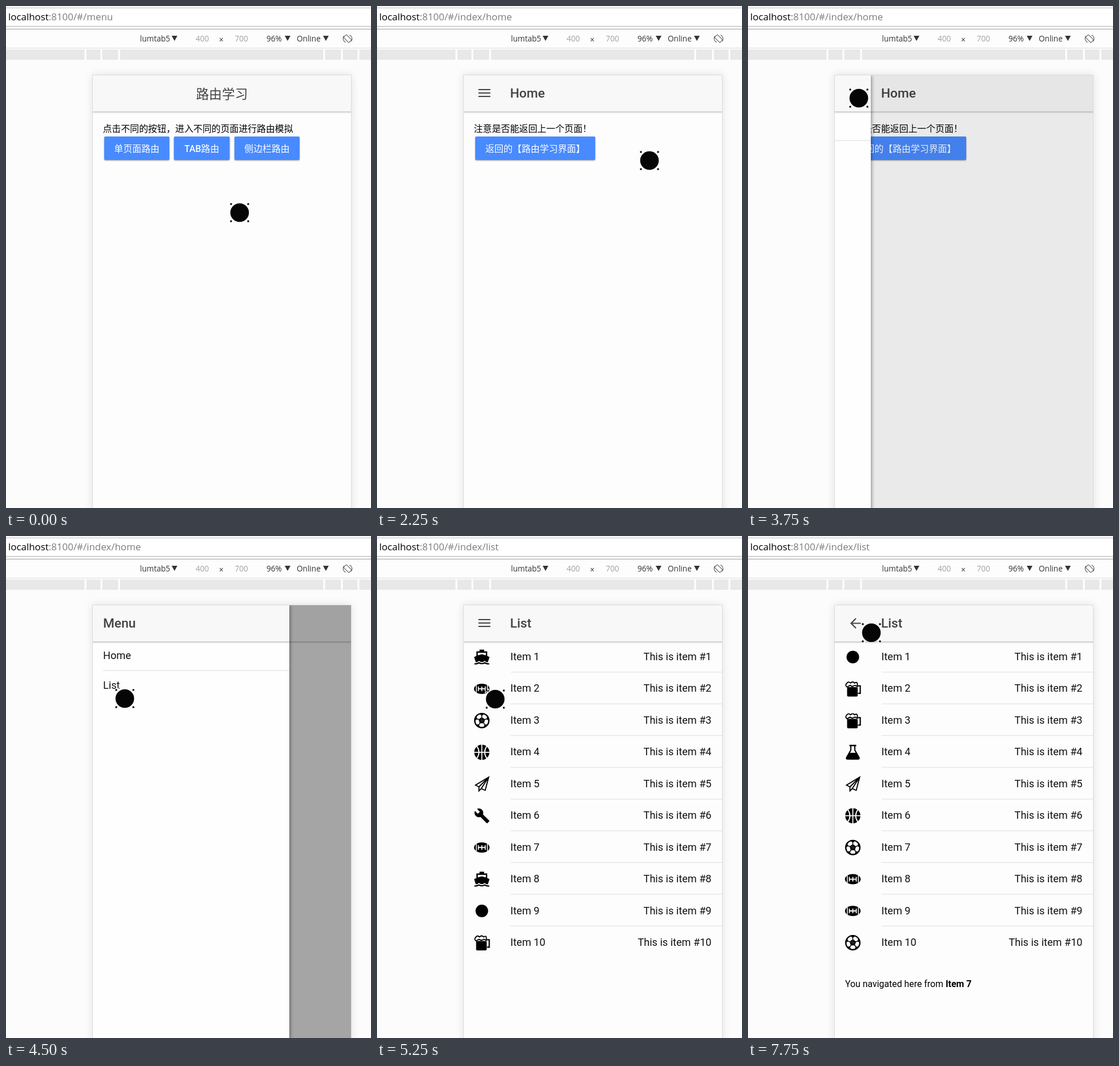
Recreate the animation shown at these times as an HTML page. Size 639x877 px, loop 8000 ms.

```html
<!DOCTYPE html>
<html lang="zh-CN">
<meta charset="utf-8">
<style>
  html, body { margin: 0; width: 100%; height: 100%; overflow: hidden; background: #fcfcfc }
  svg { display: block }
  text { font-family: Roboto, "Noto Sans CJK SC", "Noto Sans CJK", sans-serif; white-space: pre }
  .url { font: 16.9px "Open Sans", sans-serif }
  .tool { font: 13.6px "Open Sans", sans-serif; fill: #333 }
  .dim { fill: #a2a2a2 }
  .title { font-size: 22.66px; font-weight: 500; fill: #424242 }
  .body { font-size: 15.86px }
  .item { font-size: 18.13px; fill: #111 }
  .mid { text-anchor: middle }
  .end { text-anchor: end }
  .btn rect { fill: #488aff; filter: drop-shadow(0 1.5px 1px #0006) }
  .btn text { fill: #fff; font-weight: 500 }
  .phone { fill: #fdfdfd; stroke: #dcdcdc; filter: drop-shadow(0 0 7px #0000001c) }
  .ink { fill: none; stroke: #444; stroke-width: 2.2 }
  .line { fill: none; stroke: #000; stroke-width: 2.2 }
  .cut { fill: none; stroke: #fff; stroke-width: 1.8 }
</style>
<body>
<svg id="stage" width="639" height="877"></svg>
<script>
const STEP = 250, LOOP = 8000;
const $ = id => document.getElementById(id);
const text = (x, y, cls, s) => `<text x="${x}" y="${y}" class="${cls}">${s}</text>`;
const rect = (x, y, w, h, fill, more = '') =>
  `<rect x="${x}" y="${y}" width="${w}" height="${h}" fill="${fill}" ${more}/>`;
const path = (d, more = '') => `<path d="${d}" ${more}/>`;
const spin = (n, s) => Array.from({ length: n }, (_, i) => `<g transform="rotate(${i * 360 / n})">${s}</g>`).join('');
const button = (x, w, label, id = '') =>
  `<g class="btn">${rect(x, 228, w, 41, '', `rx="2" id="${id}"`)}${text(x + w / 2, 254.5, 'body mid', label)}</g>`;
const header = (x, w) => rect(x, 121, w, 64, '#f8f8f8') + rect(x, 184, w, 2.2, '#d3d3d3') + rect(x, 186, w, 1.5, '#eee');
const page = (id, s) => `<g id="${id}">${rect(152, 121, 452, 760, '#fdfdfd')}${header(152, 452)}${s}</g>`;

const burger = path('M177.5 146H198.5M177.5 152H198.5M177.5 158H198.5', 'class="ink"');
const back = path('M197.5 152.5H181M189 144L180.5 152.5 189 161', 'class="ink"');

const icons = {
  boat: path('M-4-13H4V-10H-4ZM-9.5-10H9.5V-2L13.5 0 10.5 9Q7 9 5 6.500Q0 11-5 6.500Q-7 9-10.500 9L-13.500 0-9.500-2Z') +
    path('M-7-7.500H7V-3L0-5-7-3Z', 'fill="#fff"') + path('M-13 12Q-8 12-5 10Q0 13 5 10Q8 12 13 12', 'class="line"'),
  football: path('M-9-7Q0-11 9-7V7Q0 11-9 7ZM-10.500-6Q-17 0-10.500 6ZM10.500-6Q17 0 10.500 6Z') +
    path('M-6 0H6M-6-4V4M0-4V4M6-4V4', 'class="cut"'),
  soccer: '<circle r="12.3" fill="#fff" stroke="#000" stroke-width="2.4"/>' +
    spin(5, path('M0 0V-6L5.700-1.900Z') + path('M0-5V-10', 'class="line" style="stroke-width:1.5"') + path('M-5-12L0-8.500 5-12Z')),
  basketball: '<circle r="13.3"/>' +
    path('M0-14V14M-14 0H14M-9-11Q-1 0-9 11M9-11Q1 0 9 11', 'class="cut"'),
  plane: path('M12-12L-11 2-5 5-5 12-1 8 6 11ZM-5 5L12-12-1 8', 'class="line" style="stroke-width:1.9"'),
  wrench: path('M22.700 19l-9.100-9.100c.9-2.300.4-5-1.500-6.900-2-2-5-2.400-7.400-1.300L9 6 6 9 1.600 4.700C.4 7.100.9 10.100 2.900 12.100c1.900 1.900 4.600 2.400 6.900 1.500l9.100 9.100c.4.4 1 .4 1.400 0l2.300-2.300c.5-.4.5-1.100.1-1.400z',
    'transform="translate(-14 -14) scale(1.18)"'),
  dot: '<circle r="11"/>',
  beer: rect(-10, -3, 18.5, 16.5, '#000', 'rx="2"') +
    path('M9-5H13V8H9', 'class="line"') +
    path('M-10-3Q-14-6-11-9Q-8-14-4-10Q0-14 3-10Q8-13 8-8V-4L4-6-1-4-5-6Z', 'class="line" style="stroke-width:1.9;fill:#fff"'),
  flask: path('M-6-13H6V-10.500H4.500V-4L12 9Q13 13 9 13H-9Q-13 13-12 9L-4.500-4V-10.500H-6Z') +
    path('M-2.500-10.500H2.500V-3.500L5 1H-5L-2.500-3.500Z', 'fill="#fff"'),
};

const list = names => text(233, 160, 'title', 'List') + names.split(' ').map((name, i) => {
  const y = 211 + 55.44 * i, n = i + 1;
  return `<g transform="translate(183.5 ${y + .5})">${icons[name]}</g>` +
    text(233.5, y + 6, 'item', 'Item ' + n) + text(585.5, y + 6, 'item end', 'This is item #' + n) +
    (n < 10 ? rect(234, y + 26.3, 370, 1, '#dedede') : '');
}).join('');

const arrow = x => path(`M${x} 52h10l-5 9z`, 'fill="#333"');
const toolbar = rect(0, 0, 639, 41, '#f6f6f6') + rect(0, 3, 639, 33, '#fff') +
  rect(0, 3, 639, 1, '#c8c8c8') + rect(0, 35, 639, 1, '#b4b4b4') + rect(0, 40, 639, 1, '#a8a8a8') +
  rect(0, 41, 639, 32, '#fdfdfd') + rect(0, 73, 639, 1, '#ddd') + rect(0, 76, 639, 18, '#e8e8e8') +
  [139, 167, 198, 557, 588, 617].map(x => rect(x - 1.5, 76, 3, 18, '#fff')).join('') +
  '<text x="4" y="25" class="url">localhost<tspan id="route" fill="#7c7c7c"></tspan></text>' +
  text(234.5, 62, 'tool', 'lumtab5') + text(332, 62, 'tool dim', '400') + text(373, 64, 'tool', '×') +
  text(400.5, 62, 'tool dim', '700') + text(456, 62, 'tool', '96%') + text(509, 62, 'tool', 'Online') +
  arrow(290) + arrow(488) + arrow(555) +
  `<g transform="translate(598 57) rotate(-45)" fill="none" stroke="#666" stroke-width="1.2">
    <rect x="-3.500" y="-6.500" width="7" height="13" rx="1"/><path d="M-7 2A7.500 7.500 0 0 1-1-8M7-2A7.500 7.500 0 0 1 1 8"/></g>`;

const drawer = `<g id="drawer">${rect(152, 121, 344, 760, '#fefefe', 'style="filter:drop-shadow(1px 0 3px #0007)"')}
  ${header(152, 344)}${text(170, 160, 'title', 'Menu')}${text(170, 214.5, 'item', 'Home')}
  ${rect(170, 234.5, 326, 1, '#dedede')}${text(170, 267, 'item', 'List')}</g>`;

$('stage').innerHTML = toolbar +
  rect(151.5, 120.5, 453, 800, '', 'class="phone"') +
  '<clipPath id="screen"><rect x="152" y="121" width="452" height="760"/></clipPath><g clip-path="url(#screen)">' +
  page('menu', text(378, 162, 'title mid', '路由学习') +
    text(169.5, 219.5, 'body', '点击不同的按钮，进入不同的页面进行路由模拟') +
    button(172, 114, '单页面路由') + button(294, 97.5, 'TAB路由') + button(400, 114, '侧边栏路由', 'pressed')) +
  page('home', burger + text(233, 160, 'title', 'Home') +
    text(169.5, 219.5, 'body', '注意是否能返回上一个页面！') + button(172, 210, '返回的【路由学习界面】')) +
  page('list', burger + list('boat football soccer basketball plane wrench football boat dot beer')) +
  page('detail', back + list('dot beer beer flask plane basketball soccer football football soccer') +
    text(170, 788, 'body', 'You navigated here from <tspan font-weight="700">Item 7</tspan>')) +
  rect(152, 121, 452, 760, '#000', 'id="shade"') + drawer + '</g>' +
  `<g id="cursor">${spin(4, path('M-18-11L-11-18', 'class="cut"') + rect(-16.5, -16.5, 3, 3, '#000'))}<circle r="16.3" fill="#060606"/></g>`;

// Each entry starts at its step and holds until the next.
const at = (keys, step) => keys.filter(k => k[0] <= step).pop();
const scenes = [[0, 'menu', 'menu'], [8, 'home', 'index/home'], [20, 'list', 'index/list'], [27, 'detail', 'index/list']];
const pointer = [[0, 409, 361], [1, 488, 366], [2, 516, 360], [3, 504, 314], [4, 477, 270], [13, 291, 206],
  [14, 194, 161], [16, 198, 205], [17, 207, 262], [18, 208, 284], [21, 207, 285], [22, 197, 306], [23, 402, 537],
  [24, 371, 559], [28, 336, 429], [29, 249, 209], [30, 219, 166], [31, 216, 169]];
const drawerKeys = [[0, 0, 0], [15, 63, .075], [16, 338, .345], [17, 344, .35], [20, 150, .15], [21, 0, 0]];

function draw(now) {
  const step = Math.floor(now % LOOP / STEP);
  const [start, name, route] = at(scenes, step);
  const [, x, y] = at(pointer, step);
  const [, width, dark] = at(drawerKeys, step);
  const entering = start > 0 && start !== 20 && step === start;
  for (const [, id] of scenes) $(id).style.display = id === name ? '' : 'none';
  $(name).style.opacity = entering ? .85 : 1;
  $(name).setAttribute('transform', `translate(0 ${entering ? 2 : 0})`);
  $('route').textContent = ':8100/#/' + route;
  $('pressed').style.fill = step === 6 ? '#4584f5' : step === 7 ? '#427fec' : '';
  $('drawer').style.display = width ? '' : 'none';
  $('drawer').setAttribute('transform', `translate(${width - 344} 0)`);
  $('shade').style.opacity = dark;
  $('cursor').setAttribute('transform', `translate(${x} ${y})`);
  requestAnimationFrame(draw);
}
draw(performance.now());
</script>
</body>
</html>
```
